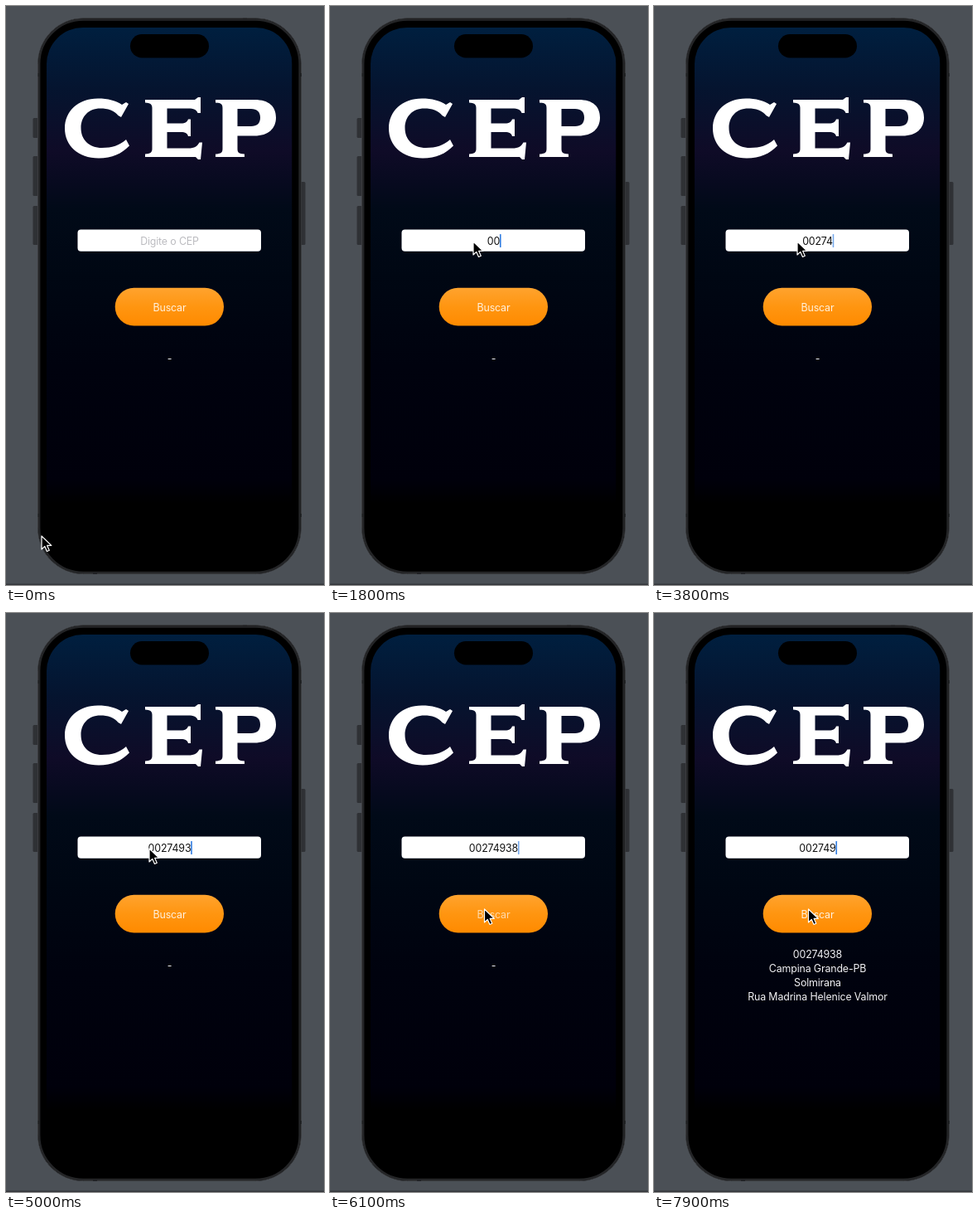
These frames come from a looping animation (384x698 px, 8 s). An HTML page:

```html
<!DOCTYPE html>
<html lang="pt-BR">
<head>
<meta charset="utf-8">
<title>CEP</title>
<style>
  html, body { margin: 0; width: 100%; height: 100%; overflow: hidden; background: #4b5056; }
  svg { display: block; width: 100vw; height: 100vh; }
  text { font: 400 12.4px Inter, "Open Sans", sans-serif; letter-spacing: -.15px; text-anchor: middle; }
</style>
</head>
<body>
<svg viewBox="0 0 384 698">
  <defs>
    <linearGradient id="sky" gradientUnits="userSpaceOnUse" x1="0" y1="26" x2="0" y2="600">
      <stop offset="0" stop-color="#001f3f"/>
      <stop offset=".13" stop-color="#05142f"/>
      <stop offset=".26" stop-color="#0f0b27"/>
      <stop offset=".32" stop-color="#080a20"/>
      <stop offset=".38" stop-color="#010a18"/>
      <stop offset=".52" stop-color="#000713"/>
      <stop offset=".71" stop-color="#00020e"/>
      <stop offset=".95" stop-color="#00000b"/>
      <stop offset="1" stop-color="#000"/>
    </linearGradient>
    <linearGradient id="orange" x2="0" y2="1">
      <stop offset="0" stop-color="#ffa32e"/>
      <stop offset=".5" stop-color="#ff9510"/>
      <stop offset="1" stop-color="#ff8a00"/>
    </linearGradient>
    <clipPath id="screen"><rect x="49" y="26" width="296.500" height="646" rx="44"/></clipPath>
  </defs>

  <rect width="384" height="698" fill="#4b5056"/>
  <rect y="696.5" width="384" height="1.5" fill="#34363b"/>

  <!-- phone body -->
  <g fill="#2f3135">
    <rect x="32.500" y="135" width="7" height="24" rx="1.5"/>
    <rect x="32.500" y="181" width="7" height="48" rx="1.5"/>
    <rect x="32.500" y="241" width="7" height="47" rx="1.5"/>
    <rect x="355.500" y="212" width="6" height="76" rx="1.5"/>
  </g>
  <rect x="38.500" y="14.800" width="317.800" height="669.800" rx="55" fill="#000" stroke="#3b3c3f"/>
  <rect x="40.200" y="16.500" width="314.400" height="666.400" rx="53.3" fill="none" stroke="#242527" stroke-width="2.4"/>
  <path d="M286 15.5h5M105 684h5M39.500 81v4M356 81v4M39.500 612v4M356 612v4" stroke="#1d1e20" stroke-width="1.6"/>

  <!-- screen -->
  <rect x="49" y="26" width="296.500" height="574" fill="url(#sky)" clip-path="url(#screen)"/>
  <rect x="150" y="34" width="95" height="28.500" rx="14.2"/>

  <g fill="#fff" fill-rule="evenodd" role="img" aria-label="CEP">
    <path d="M145 116L148 118L139 134L135.500 132C131 126 123 123.500 114 123.500C99 123.500 90.500 134 90.500 147C90.500 161 100 171 116 171C128 171 137 168 145 161L149 168.500C140 178 128 183.500 112 183.500C87 183.500 71 168 71 147.500C71 127 87 111.500 111 111.500C123 111.500 133 114 140 119Z"/>
    <path d="M168 113H228L232 110H235V129H231.500C230 125 227 123.500 220 123.500H194.500V141.500H211C217 141.500 218.500 140 220 136.500H223V157H220C219 153.500 217 152 211 152H194.500V171.500H220C228 171.500 231 169 233.500 164.500H237L235 185H232L229 182H168V178.500C174 178 176.500 177 176.500 172V123C176.500 118 174 117 168 116.500Z"/>
    <path d="M253 113H300C318 113 326 121.500 326 134.500C326 147.500 317 156.500 300 156.500H279.500V172C279.500 177 281 178 288 178.500V182H253V178.500C259.500 178 261.500 177 261.500 172V123C261.500 118 259.500 117 253 116.500ZM279.500 124V145H296C303 145 307 141.500 307 134.500C307 127.500 303 124 296 124Z"/>
  </g>

  <rect x="86.500" y="269.500" width="221.500" height="26.300" rx="4" fill="#fff"/>
  <text id="hint" x="197.500" y="287.600" fill="#bcbcc0">Digite o CEP</text>
  <text id="code" x="197.500" y="287.600" fill="#111"></text>
  <rect id="caret" y="275" width="1.6" height="16" rx=".5" fill="#2f7be0"/>

  <rect x="131.700" y="339.800" width="131.300" height="45.700" rx="22.800" fill="url(#orange)"/>
  <text id="label" x="197.500" y="367.500" fill="#fff0dc">Buscar</text>

  <text id="dash" x="197.500" y="429" fill="#f2f2f4">-</text>
  <g id="result" fill="#f2f2f4">
    <text x="197.500" y="416.400">00274938</text>
    <text x="197.500" y="433.400">Campina Grande-PB</text>
    <text x="197.500" y="450.400">Solmirana</text>
    <text x="197.500" y="467.400">Rua Madrina Helenice Valmor</text>
  </g>

  <path id="pointer" d="M0 0V16L3.800 12.400L6.500 18.500L9.300 17.300L6.700 11.400H11.800Z" fill="#000" stroke="#fff" stroke-width="1.2" stroke-linejoin="round"/>
</svg>

<script>
const LOOP = 8000, CENTER = 197.5, CODE = "00274938";
const FOCUS = 1000, PRESS = 6000, RELEASE = 6300, ANSWER = 6600;

// [time, number of digits in the field]
const keys = [
  [FOCUS, 0], [1500, 1], [1800, 2], [3000, 3], [3200, 4], [3500, 5],
  [4700, 6], [4900, 7], [5200, 8], [7400, 7], [7800, 6]
];
// [start, end, from, to]
const moves = [
  [50, 400, [43, 639], [173, 284]],
  [5350, 5750, [173, 284], [186.5, 357]]
];

const el = id => document.getElementById(id);
const hint = el("hint"), code = el("code"), caret = el("caret"), label = el("label");
const dash = el("dash"), result = el("result"), pointer = el("pointer");

const clamp = v => Math.min(1, Math.max(0, v));
const ease = v => v * v * (3 - 2 * v);
const show = (node, on) => node.setAttribute("visibility", on ? "visible" : "hidden");

// The caret restarts its blink at every key press.
function blink(age) {
  const u = age % 600;
  return u < 400 ? clamp((380 - u) / 120) : clamp((u - 450) / 100);
}

function drawField(t) {
  const [since, count] = keys.findLast(k => k[0] <= t) || [0, 0];
  code.textContent = CODE.slice(0, count);
  show(hint, !count);
  show(caret, t >= FOCUS);
  const width = (count ? code : hint).getComputedTextLength();
  caret.setAttribute("x", CENTER + (count ? width / 2 - .2 : -width / 2 - 1.6));
  caret.setAttribute("opacity", blink(t - since));
}

function drawPointer(t) {
  const [start, end, a, b] = moves.findLast(m => m[0] <= t) || moves[0];
  const p = ease(clamp((t - start) / (end - start)));
  const [x, y] = a.map((v, i) => v + (b[i] - v) * p);
  pointer.setAttribute("transform", `translate(${x} ${y})`);
}

function render(t) {
  drawField(t);
  drawPointer(t);
  label.setAttribute("opacity", t >= PRESS && t < RELEASE ? .75 : 1);
  show(dash, t < ANSWER);
  show(result, t >= ANSWER);
}

const origin = performance.now();
function tick() {
  render((performance.now() - origin) % LOOP);
  requestAnimationFrame(tick);
}
tick();
</script>
</body>
</html>
```
